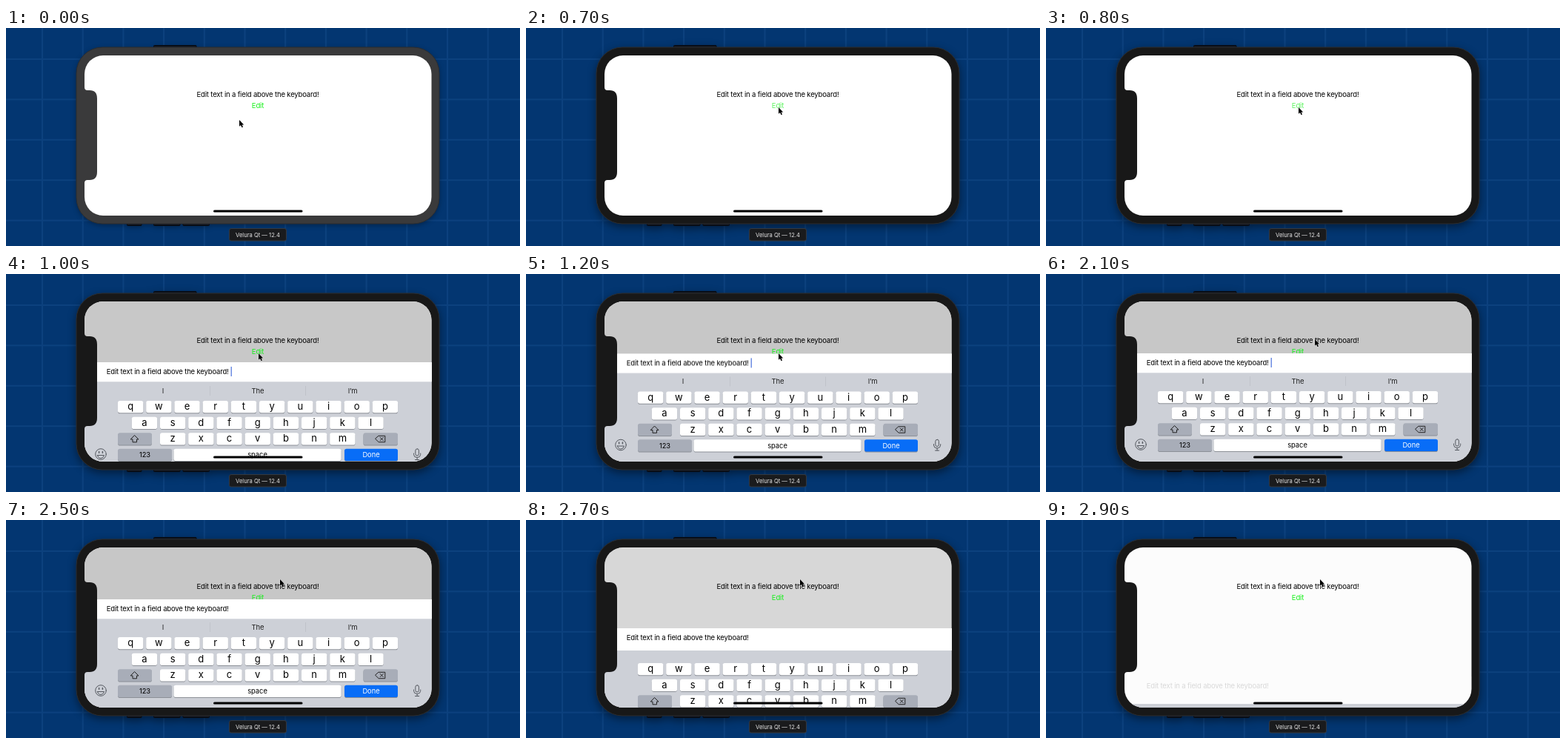
Recreate the animation shown at these times as an HTML page. Size 694x294 px, loop 3 s.

```html
<!DOCTYPE html>
<html lang="en">
<head>
<meta charset="utf-8">
<title>Field above the keyboard</title>
<style>
html, body { margin: 0; width: 100%; height: 100%; overflow: hidden; background: #033671; }
svg { display: block; width: 694px; height: 294px; font-family: Inter, Roboto, sans-serif; }
.copy { font-size: 9.5px; letter-spacing: -.017em; }
.mid { text-anchor: middle; }
.letter { font-size: 13px; }
.small { font-size: 9.3px; }
.icon { fill: none; stroke: #222; stroke-width: 1; stroke-linejoin: round; stroke-linecap: round; }

/* everything moves in hard steps of a tenth of a second */
.frame, .body, .edit, .dim, .board, .hints, .field, .tail, .caret, .pointer {
  animation: 3s step-end infinite;
}
.frame { animation-name: frame; }
.body { animation-name: body; }
.edit { animation-name: edit; fill: #16f01a; }
.dim { animation-name: dim; }
.board { animation-name: board; }
.hints { animation-name: hints; }
.field { animation-name: field; }
.tail { animation-name: tail; }
.caret { animation-name: caret; }
.pointer { animation-name: pointer; }

@keyframes frame {
  0% { filter: drop-shadow(0 2px 3px rgba(0,0,0,.3)); }
  20% { filter: drop-shadow(0 4px 6px rgba(0,0,0,.45)); }
}
@keyframes body {
  0% { fill: #3a3a3b; }
  20% { fill: #181818; }
}
@keyframes edit {
  0% { opacity: 1; }
  20% { opacity: .7; }
  30% { opacity: 1; }
}
@keyframes dim {
  0% { opacity: 0; }
  30% { opacity: .58; }
  33.33% { opacity: .97; }
  36.66% { opacity: 1; }
  90% { opacity: .71; }
  93.33% { opacity: .22; }
  96.66% { opacity: .05; }
}
@keyframes board {
  0% { transform: translateY(130px); }
  30% { transform: translateY(51px); }
  33.33% { transform: translateY(13px); }
  36.66% { transform: translateY(3px); }
  40% { transform: translateY(.5px); }
  43.33% { transform: none; }
  90% { transform: translateY(35px); }
  93.33% { transform: translateY(97px); }
  96.66% { transform: translateY(117px); }
}
@keyframes hints {
  0% { opacity: 1; }
  90% { opacity: 0; }
}
@keyframes field {
  0% { transform: translateY(107px); opacity: 0; }
  30% { transform: translateY(46px); opacity: .6; }
  33.33% { transform: translateY(12px); opacity: 1; }
  36.66% { transform: translateY(2.7px); opacity: 1; }
  40% { transform: translateY(.4px); opacity: 1; }
  43.33% { transform: none; opacity: 1; }
  90% { transform: translateY(39px); opacity: 1; }
  93.33% { transform: translateY(89px); opacity: .42; }
  96.66% { transform: translateY(104px); opacity: .14; }
}
@keyframes tail {
  0% { opacity: 0; }
  90% { opacity: 1; }
}
@keyframes caret {
  0% { opacity: 0; }
  30% { opacity: 1; }
  46.66% { opacity: .5; }
  50% { opacity: 0; }
  53.33% { opacity: .5; }
  56.66% { opacity: 1; }
  80% { opacity: .5; }
  83.33% { opacity: 0; }
}
@keyframes pointer {
  0% { transform: translate(315px, 124px); }
  3.33% { transform: translate(319px, 121px); }
  6.66% { transform: translate(333px, 112px); }
  10% { transform: translate(341px, 107px); }
  60% { transform: translate(343px, 106px); }
  63.33% { transform: translate(349px, 101px); }
  66.66% { transform: translate(357px, 94px); }
  70% { transform: translate(363px, 88px); }
  73.33% { transform: translate(368px, 82px); }
  76.66% { transform: translate(370px, 80px); }
}
</style>
</head>
<body>
<svg viewBox="0 0 694 294">
  <defs>
    <pattern id="grid" x="48" y="41" width="54.7" height="54.4" patternUnits="userSpaceOnUse">
      <path d="M1 0V54.4M0 1H54.7" stroke="#0c417e" stroke-width="2"/>
    </pattern>
    <clipPath id="screen"><rect x="106" y="37" width="468.5" height="216" rx="25"/></clipPath>
  </defs>

  <rect width="694" height="294" fill="#033671"/>
  <rect width="694" height="294" fill="url(#grid)"/>

  <g class="frame">
    <g fill="#10151f" stroke="#05080e">
      <rect x="199.5" y="23.5" width="57.5" height="6" rx="1"/>
      <rect x="163.5" y="260" width="19.5" height="6.5" rx="1"/>
      <rect x="199.5" y="260" width="35.5" height="6.5" rx="1"/>
      <rect x="239" y="260" width="35.5" height="6.5" rx="1"/>
    </g>
    <rect class="body" x="95" y="26" width="490" height="238" rx="35" stroke="#2c2d2f" stroke-width="1"/>
  </g>

  <g clip-path="url(#screen)">
    <rect x="106" y="37" width="469" height="216" fill="#fff"/>
    <rect class="dim" x="106" y="37" width="469" height="216" fill="#c7c7c7"/>
    <text class="copy mid" x="340" y="92.5">Edit text in a field above the keyboard!</text>
    <text class="copy mid edit" x="340" y="108">Edit</text>

    <g class="board">
      <rect x="106" y="131" width="469" height="124" fill="#cdd0d7"/>
      <g class="hints">
        <path d="M275.5 138V151M404.5 138V151" stroke="#c0c3ca"/>
        <g class="copy mid" fill="#222">
          <text x="212" y="147.5">I</text>
          <text x="340" y="147.5">The</text>
          <text x="468" y="147.5">I’m</text>
        </g>
      </g>
      <g id="keys"></g>
      <g class="icon">
        <path d="M173.8 204.8L179 210H176.5V213.8H171V210H168.6Z"/>
        <path d="M503.2 205.3H511.8V213.7H503.2L498.8 209.5ZM505.3 207.5L509.3 211.5M509.3 207.5L505.3 211.5"/>
      </g>
      <g class="icon" style="stroke:#555960">
        <circle cx="128" cy="230" r="7.3"/>
        <path d="M123.5 231.5H132.5Q131.5 235.5 128 235.5T123.5 231.5Z"/>
        <path d="M125.6 226.5V228.2M130.4 226.5V228.2" stroke-width="1.5"/>
        <rect x="552.8" y="222.8" width="4.6" height="9.2" rx="2.3"/>
        <path d="M550.5 229V230.5Q550.8 234.5 555.1 234.5T559.7 230.5V229M555.1 234.5V237.5M552.5 237.5H557.7"/>
      </g>
    </g>

    <g class="field">
      <rect x="106" y="107" width="469" height="26.3" fill="#fff"/>
      <rect class="tail" x="106" y="133" width="469" height="4" fill="#fff"/>
      <text class="copy" x="135.7" y="123">Edit text in a field above the keyboard!</text>
      <rect class="caret" x="303.6" y="113" width="1.2" height="13" fill="#4a72dc"/>
    </g>

    <rect x="280" y="245.4" width="120.5" height="3" rx="1.5"/>
  </g>
  <path class="body" d="M105 80H106Q106 84 110 84H113Q123 84 123 95V194Q123 205 113 205H110Q106 205 106 209H105Z"/>

  <rect x="301.5" y="270.5" width="77" height="16.5" rx="2.5" fill="#1a1b1d" stroke="#34383f"/>
  <text class="mid" x="340" y="281.7" font-size="7.6" fill="#e8e8e8">Velura Qt — 12.4</text>

  <path class="pointer" d="M0 0V8.8L2 7L3.5 10.3L5 9.6L3.6 6.4H6.2Z" stroke="#fff" stroke-width=".7" paint-order="stroke"/>
</svg>
<script>
const keys = document.getElementById('keys');

function add(tag, attrs, text = '') {
  const el = document.createElementNS('http://www.w3.org/2000/svg', tag);
  for (const name in attrs) el.setAttribute(name, attrs[name]);
  el.textContent = text;
  keys.append(el);
}

function addKey(x, y, width, label, { fill = '#fff', ink = '#000', style = 'letter' } = {}) {
  const box = { x, width, height: 16.3, rx: 2.8 };
  add('rect', { ...box, y: y + 0.9, fill: '#8c9097' });
  add('rect', { ...box, y, fill });
  const baseline = y + (style === 'letter' ? 12 : 11.2);
  add('text', { x: x + width / 2, y: baseline, class: 'mid ' + style, fill: ink }, label);
}

const rows = [['qwertyuiop', 151, 158], ['asdfghjkl', 169.8, 179.7], ['zxcvbnm', 208, 201.3]];
for (const [letters, left, top] of rows) {
  [...letters].forEach((letter, i) => addKey(left + i * 38.2, top, 34.3, letter));
}

const gray = { fill: '#a8adb8', style: 'small' };
addKey(151, 201.3, 46, '', gray);
addKey(482.5, 201.3, 46.5, '', gray);
addKey(151, 222.8, 73, '123', gray);
addKey(226.5, 222.8, 226, 'space', { style: 'small' });
addKey(457, 222.8, 72, 'Done', { fill: '#086df7', ink: '#fff', style: 'small' });
</script>
</body>
</html>
```
